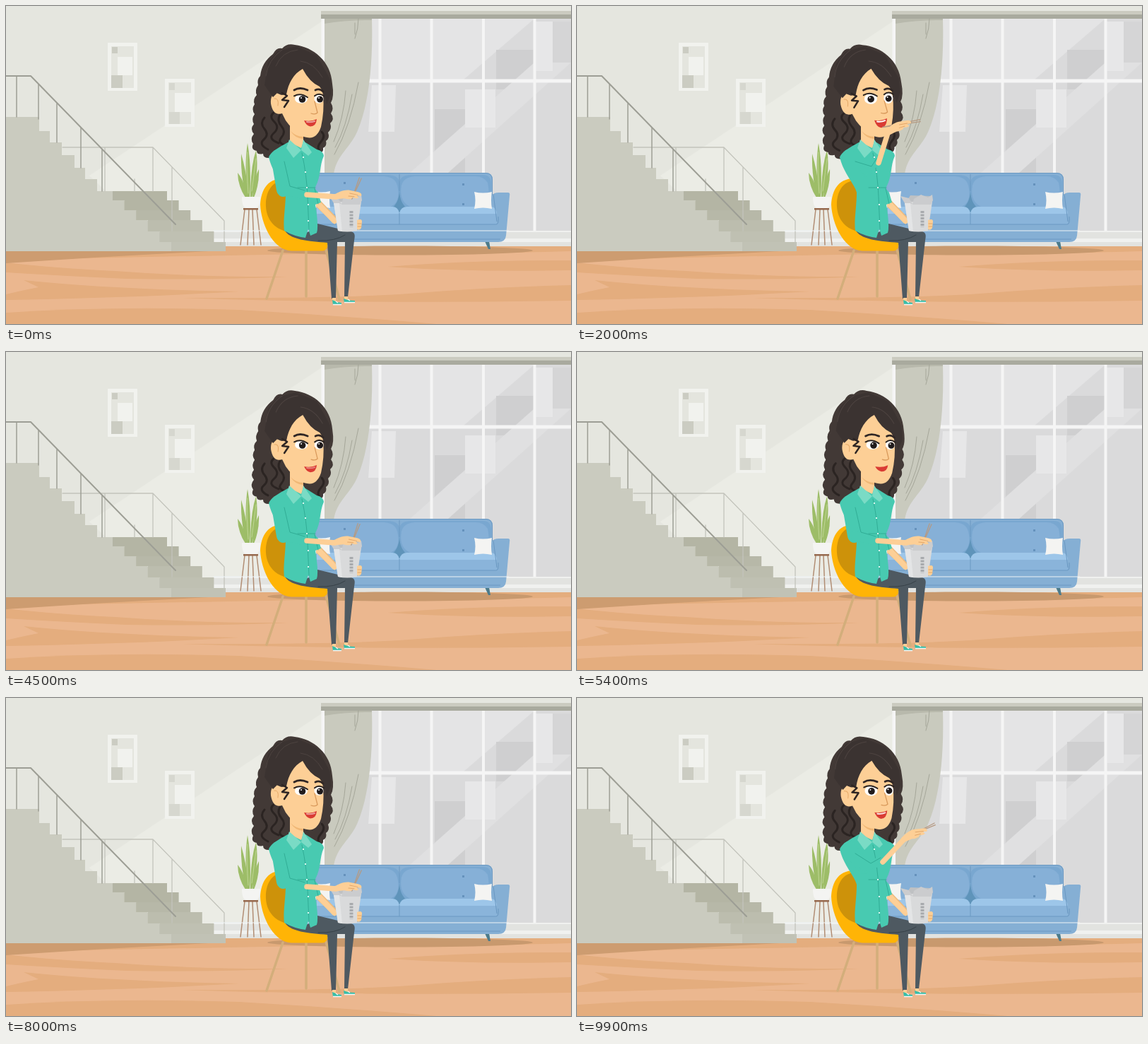
Recreate the animation shown at these times as an HTML page. Size 800 by 450 pixels, loop 10000 ms.

```html
<!DOCTYPE html>
<html lang="en">
<head>
<meta charset="utf-8">
<title>Woman eating takeaway</title>
<style>
html, body { margin: 0; width: 100%; height: 100%; overflow: hidden; background: #e5e6df; }
svg { display: block; width: 100vw; height: 100vh; }
.line { fill: none; stroke-linecap: round; stroke-linejoin: round; }
.skin { fill: #fdcf96; }
.teal { fill: #48cab1; }
.hair { fill: #3b3331; }
.curls { fill: #423936; }
</style>
</head>
<body>
<svg viewBox="0 0 800 450" preserveAspectRatio="none">
<defs>
  <clipPath id="pane"><path d="M451 18H800V330H451Z"/></clipPath>
  <g id="picture">
    <path fill="#f1f2ee" d="M144 52h42v68h-42Z"/>
    <path fill="#e4e5de" d="M149 57h32v59h-32Z"/>
  </g>
</defs>

<!-- wall -->
<path fill="#e5e6df" d="M0 0H800V345H0Z"/>
<path fill="#ebece5" d="M447 22L118 240L230 345H447Z"/>
<use href="#picture"/>
<path fill="#cbccc2" d="M150 58h8v9h-8ZM149 98h16v18h-16Z"/>
<path fill="#f1f2ee" d="M158 72h21v26h-21Z"/>
<use href="#picture" x="81" y="51"/>
<path fill="#d6d7cf" d="M231 109h8v10h-8ZM231 150h15v17h-15Z"/>
<path fill="#f1f2ee" d="M239 123h23v27h-23Z"/>

<!-- window -->
<g clip-path="url(#pane)">
  <path fill="#dadadb" d="M451 18H800V334H451Z"/>
  <path fill="#e4e4e5" d="M451 18H748L648 104H451Z"/>
  <path fill="#cfcfd0" d="M694 62H747V118H694ZM607 146H650V236H607Z"/>
  <path fill="#e0e0e1" d="M800 34V80L626 236H572Z"/>
  <path fill="#d5d5d6" d="M774 22H800V80H774Z"/>
  <path fill="#e7e7e8" d="M518 112H552L550 178H513ZM650 118H693V172H650ZM750 22H774V92H750Z"/>
</g>
<g class="line" stroke="#f5f5f5" stroke-width="4">
  <path stroke-width="5" d="M449 18V340M451 106H800"/>
  <path d="M529.500 18V330M602.500 18V330M676 18V330M748.500 18V330"/>
</g>
<path fill="#cbcbc0" d="M446 7H800V13H446Z"/>
<path fill="#a9aa9e" d="M446 12H800V18H446Z"/>
<path fill="#c9cabe" d="M451 18H518C520 85 513 140 498 176C488 201 468 210 464 238H451Z"/>
<path fill="#b8b9ac" d="M451 18H518V20Q480 20 451 25Z"/>
<path class="line" stroke="#a5a699" d="M499 18Q499 32 494 46M494 24V40M499 108Q488 170 465 210M481 120Q478 160 464 192M490 125Q482 172 466 200"/>
<path fill="#f0f1ef" d="M294 318H800V340H294Z"/>
<path fill="#e2e3e0" d="M294 320H800V329H294ZM294 334H800V340H294Z"/>

<!-- floor -->
<path fill="#ebb78f" d="M0 340H800V450H0Z"/>
<g fill="#e4ad7e">
  <path d="M0 340H800V347Q640 352 470 350L0 359Z"/>
  <path d="M800 360Q660 359 540 369Q660 377 800 374Z"/>
  <path d="M155 375Q270 384 400 383Q300 388 170 386Q80 382 0 377V363Q70 371 155 375Z"/>
  <path d="M0 408Q25 402 46 398L25 388Q150 401 330 404Q180 413 0 416Z"/>
  <path d="M800 395Q680 398 570 407Q480 414 250 413Q520 422 800 417Z"/>
  <path d="M0 434Q150 424 330 430Q470 438 610 450H0Z"/>
</g>
<path fill="#cd9c70" d="M0 346H310Q160 353 0 364Z"/>
<ellipse cx="558" cy="346" rx="188" ry="6.500" fill="#c8996e"/>

<!-- stairs -->
<path fill="#cacbbf" d="M0 157H47V177H62V193H79V211H97V229H112V245H129V262H151L167 275L184 289L200 303L217 319L234 334V347H0Z"/>
<g id="steps"></g>
<g class="line">
  <path stroke="#c3c4bc" stroke-width="1.300" d="M80 200H208L309 304V340M140 200V262M208 200V262M182 245V262M235 228V318"/>
  <path stroke="#9d9e95" stroke-width="2" d="M0 99H35L240 309"/>
  <path stroke="#9d9e95" stroke-width="1.500" d="M15 99V157M46 111V160M72 138V193M106 172V229M136 203V262"/>
</g>

<!-- plant -->
<g fill="#9dbd68">
  <path d="M342 271Q337 225 342 194Q348 228 345 271Z"/>
  <path d="M346 271Q346 228 354 204Q359 233 348 271Z"/>
  <path d="M340 271Q332 240 333 209Q342 240 343 271Z"/>
  <path d="M339 271Q328 254 328 236Q338 248 341 271Z"/>
  <path d="M349 271Q350 246 358 231Q359 252 351 271Z"/>
</g>
<path class="line" stroke="#c8dca0" stroke-width=".8" d="M343 265Q340 230 342 207M348 262Q352 232 354 216"/>
<path class="line" stroke="#b18d73" stroke-width="1.500" d="M338 288L332 338M344 288L342 338M349 288L351 338M355 288L361 338"/>
<path fill="#f4f4f2" d="M334 270H360Q360 286 353 286H341Q334 286 334 270Z"/>
<path fill="#96694e" d="M336 286H357V288.500H336Z"/>

<!-- sofa -->
<path fill="#4c7b8b" d="M678 333H684L686 344H683Z"/>
<path fill="#85afd4" d="M412 236H680Q689 236 689 246V268Q690 264 698 264H711Q714 264 713 269L708 325Q707 334 697 334H412Z"/>
<path fill="#79a7d0" d="M440 239H540Q556 239 557 250Q558 239 574 239H675Q687 239 687 252V285H440Z"/>
<path fill="#86b0d7" d="M440 241H535Q551 242 554 254Q560 276 545 284H440ZM560 254Q563 242 579 241H665Q676 241 682 250Q686 270 680 284H572Q556 276 560 254Z"/>
<path fill="#5f94ba" d="M557 262Q558 280 569 287L557 294L545 287Q556 280 557 262Z"/>
<path fill="#9dc6e9" d="M440 284H547Q555 284 557 293Q559 284 568 284H687Q695 285 695 295H440Z"/>
<path fill="#8ab4da" d="M440 294H695V309H440Z"/>
<path fill="none" stroke="#6a98c2" d="M412 236.500H680Q688.500 237 688.500 246V268M440 309H694Q698 309 697 298M557 238V262M557 293V309M690 266L695 305M440 330H700"/>
<path fill="#6592bc" d="M478 249h3v3h-3ZM646 251h3v3h-3ZM478 279h3v3h-3ZM646 279h3v3h-3Z"/>
<path id="cushion" fill="#f4f4f2" d="M663 263Q675 266 688 263Q686 275 688 287Q675 284 663 287Q666 275 663 263Z"/>
<use href="#cushion" x="-229" y="-1"/>
<path stroke="#eef3f6" d="M294 318H712"/>

<!-- chair -->
<path class="line" stroke="#d3ae7b" stroke-width="3.500" d="M392 346L369 414M425 346V411M453 345L472 415"/>
<path fill="#ffb406" d="M395 244C369 243 361 262 360 281C361 307 377 345 404 346.500H448Q456 346 456 334L420 322Z"/>
<path fill="#cd920a" d="M394 247C373 248 367 268 368 284C369 302 380 315 397 319L405 260Z"/>

<!-- woman -->
<g class="head">
  <path class="curls" d="M378 68Q383 58 391 60Q398 52 409 55C435 58 460 78 462 110Q465 129 460 137Q465 145 460 152Q466 160 459 166Q462 174 456 179Q459 187 453 191Q455 198 449 201Q450 207 443 209L372 215Q364 215 364 209Q355 211 355 205Q346 203 350 195Q345 188 351 181Q345 174 351 167Q347 160 352 153Q347 146 352 139Q349 132 355 126Q352 119 357 112Q355 104 360 99Q362 80 378 68Z"/>
  <path class="line" stroke="#2b2422" stroke-width="3" d="M379 151Q372 156 380 164T379 180T386 194M388 154Q383 162 390 170T390 186T398 198M366 158Q359 166 366 174T365 189T371 203M447 178Q453 184 446 192T444 205"/>
</g>
<path fill="#eebb7e" d="M440 270L467 298L466 309L439 284Z"/>
<path class="line" stroke="#fdcf96" stroke-width="8" d="M443 281L465 304"/>
<path fill="#4e5961" d="M394 316C410 324 430 326 441 308L470 315L489 319C495 321 494 326 493 332L484 412H479L480 334H469L467 414H461L455 335C430 333 400 331 394 316Z"/>
<path class="line" stroke="#374148" d="M442 332Q466 333 480 324"/>
<path class="skin" d="M462 413h5v5h-5ZM479 411h5v5h-5Z"/>
<path fill="#36bda7" d="M462 416Q468 419 475 420V423H463ZM478 414Q485 417 494 417V420H479Z"/>
<path stroke="#f6f6f6" stroke-width="1.500" d="M463 422.500H475M479 419.500H494M467 418l3 2M484 415l3 2"/>
<path class="teal" d="M399 193C386 200 374 207 372 214C377 236 393 252 396 264C396 284 392 304 394 318Q408 326 424 328L428 315L431 325L440 321Q443 312 438 281L446 278L442 264L437 258C447 240 443 228 450 212Q449 205 440 203L424 193Z"/>
<path class="line" stroke="#2ba58f" stroke-width=".8" d="M419 208Q426 240 427 270L429 316M413 257H438M437 258L442 280"/>
<path fill="#d9f5ee" d="M420 213h2v2h-2ZM423 234h2v2h-2ZM425 256h2v2h-2ZM427 280h2v2h-2ZM427 303h2v2h-2Z"/>
<path class="skin" d="M402 160L421 180V192L418 201L402 193Z"/>
<path fill="#f0b776" d="M403 177Q411 185 421 185V188Q410 188 403 177Z"/>
<path fill="#7adbc5" d="M401 189L418 204L407 215L397 201ZM421 189L433 207L428 212L418 204Z"/>

<g class="head">
  <path class="skin" d="M418 86C432 94 448 108 449 128Q451 148 446 171Q440 189 426 186Q412 184 396 162L391 152Q378 156 375 138Q374 125 383 123L390 126Q399 100 418 86Z"/>
  <path class="hair" d="M420 89C407 96 400 109 397 125L391 126L384 123L378 129L366 112L371 80L384 64L411 57L440 70L459 104L460 124L454 139Q452 124 444 114Q430 108 420 89Z"/>
  <path class="line" stroke="#4d4340" stroke-width="1" d="M391 62Q371 76 368 99M413 62Q391 64 382 85M417 78Q436 80 448 101"/>
  <path class="line" stroke="#2d2523" stroke-width="2.500" d="M391 123L398 127L391 133L400 134L394 143"/>
  <path class="line" stroke="#e4a968" d="M380 131Q387 130 385 141"/>
  <path class="line" stroke="#302725" stroke-width="2.800" d="M408 119Q416 114 427 119M438 119Q444 116 449 121"/>
  <ellipse class="eye" cx="418" cy="131.500" rx="9" fill="#fff"/>
  <ellipse class="eye" cx="443" cy="131.500" rx="6.500" fill="#fff"/>
  <g id="pupils" fill="#211c1c"><circle cx="419.500" cy="132" r="4.800"/><circle cx="444.500" cy="132" r="4.500"/>
    <circle cx="418" cy="130" r="1" fill="#fff"/><circle cx="443" cy="130" r="1" fill="#fff"/></g>
  <path id="lids" class="line" stroke="#27211f" stroke-width="2"/>
  <path class="line" stroke="#d99a5c" stroke-width="1.300" d="M437 135L441 151Q438 154 432 152"/>
  <path id="mouth" fill="#d93b34"/>
  <path id="teeth" class="line" stroke="#fff" stroke-width="2" d="M426 164Q432 165 437 163"/>
</g>

<!-- food box and near arm -->
<path fill="#bfc1c3" d="M465 279L472 268L500 269L501 280Z"/>
<path fill="#d9dadb" d="M464 277H503L497 318Q483 321 470 318Z"/>
<path fill="#cbccce" d="M458 269L470 272L475 280L464 279ZM477 273L487 267L497 271L503 267L504 275L501 281H475Z"/>
<path fill="#e4e5e6" d="M464 279L472 279L476 319L470 318Z"/>
<path stroke="#a8aaad" stroke-width="5" stroke-dasharray="3 1.500" d="M489 290V313"/>
<path class="skin" d="M497 303Q504 300 504 305L503 314Q501 318 497 316Z"/>
<path class="line" stroke="#e0a66a" d="M498 308H503M498 312H503"/>
<path id="upper" class="line" stroke="#48cab1" stroke-width="20"/>
<path id="cuff" class="line" stroke="#48cab1" stroke-width="13"/>
<path id="fold" class="line" stroke="#2ba58f" stroke-width=".8"/>
<path id="forearm" class="line" stroke="#fdcf96" stroke-width="7.500"/>
<path id="sticks" class="line" stroke="#b59a83" stroke-width="1.300"/>
<g id="hand">
  <path class="skin" d="M-2 -3.500C6 -7 13 -10 21 -8L32 -5Q38 -3 36 1L30 0L32 3Q29 5 24 2L22 4Q17 5 12 3L-1 3.500Z"/>
  <path class="line" stroke="#e0a66a" d="M20 -4L31 -1M18 0L26 1"/>
</g>
</svg>

<script>
const LOOP = 10000, CYCLE = 4000, STEP = 100;
const $ = id => document.getElementById(id);
const set = (id, d) => $(id).setAttribute("d", d);

const tones = ["#b4b5a4", "#b4b5a4", "#b7b8a8", "#bcbdae", "#bfc0b2", "#c1c2b5"];
const tops = [262, 275, 289, 303, 319, 334, 347];
$("steps").innerHTML = tones.map((tone, i) =>
  `<rect x="${151 + i * 16.6}" y="${tops[i]}" width="77" height="${tops[i + 1] - tops[i]}" fill="${tone}"/>`).join("");

// time, elbow xy, cuff xy, wrist xy, hand angle, stick angle, stick tail, head tilt, mouth opening, eye height
const poses = [
  [0, 393, 260, 423, 267, 467, 270, -3, -68, 8, 0, 5.5, 6.2],
  [1500, 393, 260, 423, 267, 467, 270, -3, -66, 8, 0.5, 4, 6.2],
  [1900, 407, 239, 430, 232, 462, 201, -22, -25, 8, -1.5, 6.5, 7.2],
  [2000, 408, 232, 424, 222, 440, 180, -25, -10, 30, -2, 8, 7.5],
  [2200, 408, 232, 425, 222, 441, 179, -25, -10, 30, -3, 5, 7.2],
  [2500, 410, 233, 436, 226, 467, 192, -15, -1, 8, -5.5, 3.5, 7],
  [3000, 410, 233, 436, 226, 467, 193, -14, -4, 8, -4, 3.5, 6.5],
  [3600, 399, 250, 433, 253, 478, 245, -6, -50, 10, 0, 6, 6.2],
  [4000, 393, 260, 423, 267, 467, 270, -3, -68, 8, 0, 5.5, 6.2]
];

function poseAt(t) {
  const i = poses.findIndex(p => p[0] > t);
  const a = poses[i - 1], b = poses[i];
  const u = (t - a[0]) / (b[0] - a[0]), k = u * u * (3 - 2 * u);
  return a.map((v, n) => v + (b[n] - v) * k).slice(1);
}

function draw(t) {
  const phase = t % CYCLE;
  let [ex, ey, cx, cy, wx, wy, turn, aim, tail, tilt, open, eye] = poseAt(phase);
  if (phase < 1500) {
    const stir = Math.sin(phase / 1500 * Math.PI * 4);
    wx += stir * 1.5;
    aim += stir * 3;
  }
  const rad = turn * Math.PI / 180, dir = aim * Math.PI / 180;
  const gx = wx + 26 * Math.cos(rad) + 3 * Math.sin(rad);
  const gy = wy + 26 * Math.sin(rad) - 3 * Math.cos(rad);
  const dx = Math.cos(dir), dy = Math.sin(dir);
  const stick = side => `M${gx - dx * tail} ${gy - dy * tail}L${gx + dx * 24 - dy * side} ${gy + dy * 24 + dx * side}`;

  set("upper", `M385 213L${ex} ${ey}`);
  set("cuff", `M${ex} ${ey}L${cx - 3} ${cy}`);
  set("fold", `M394 220L${ex + 9} ${ey - 5}L${cx} ${cy - 6}`);
  set("forearm", `M${cx + 3} ${cy}L${wx} ${wy}`);
  set("sticks", stick(-1.5) + stick(1.5));
  $("hand").setAttribute("transform", `translate(${wx} ${wy}) rotate(${turn})`);

  document.querySelectorAll(".head").forEach(h => h.setAttribute("transform", `rotate(${tilt} 412 190)`));
  document.querySelectorAll(".eye").forEach(e => e.setAttribute("ry", eye));
  const lid = 132.5 - eye;
  set("lids", `M408 ${lid + 1}Q417 ${lid - 4} 427 ${lid + 3}M437 ${lid + 1}Q443 ${lid - 4} 450 ${lid + 1}`);
  $("pupils").setAttribute("transform", `translate(${6.2 - eye} 0)`);
  set("mouth", `M422 162Q432 164 440 160Q439 ${165 + open} 431 ${165 + open}Q425 ${164 + open} 422 162Z`);
  $("teeth").style.opacity = Math.max(0, Math.min(1, (open - 4) / 3));
}

function tick() {
  draw(Math.floor(performance.now() % LOOP / STEP) * STEP);
  requestAnimationFrame(tick);
}
tick();
</script>
</body>
</html>
```
